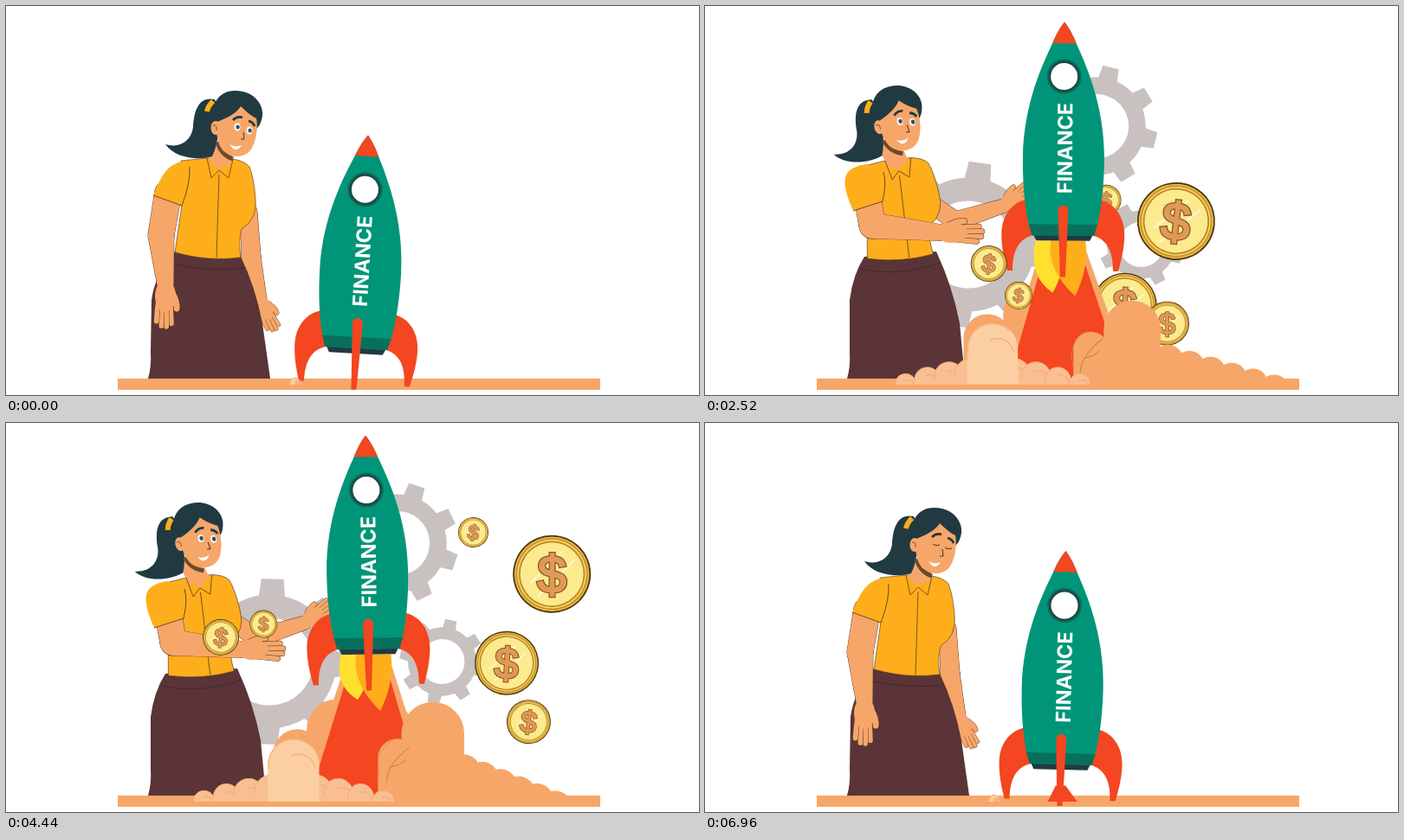
An HTML page with a canvas that plays this animation: 800x450 px, repeating every 7 s.

```html
<!DOCTYPE html>
<html lang="en">
<head>
<meta charset="utf-8">
<title>Finance launch</title>
<style>
html, body { margin: 0; width: 100%; height: 100%; overflow: hidden; background: #fff; }
canvas { display: block; }
</style>
</head>
<body>
<canvas id="stage" width="800" height="450"></canvas>
<script>
const c = document.getElementById('stage').getContext('2d');
const LOOP = 7000, STEP = 40, TAU = Math.PI * 2, RAD = Math.PI / 180;
const SKIN = '#f7a66a', SAND = '#f7a669', RED = '#f44620', GREEN = '#009578';
const DARK = '#213a41', SHIRT = '#ffae1b', SKIRT = '#5a3437', LINE = '#4a3020', GREY = '#c9c1c0';

// Motion
const mix = (a, b, u) => a + (b - a) * u;
const mixPt = (a, b, u) => [mix(a[0], b[0], u), mix(a[1], b[1], u)];
function ease(t, from, to) {
  const s = Math.min(1, Math.max(0, (t - from) / (to - from)));
  return s * s * (3 - 2 * s);
}
const launch = t => 1 / (1 + Math.pow(1016 / Math.max(t, 1), 3.7));
const landing = t => ease(t, 5950, 6980);
const growth = t => launch(t) * (1 - ease(t, 5950, 6920));

// Drawing helpers
function fill(color) { c.fillStyle = color; c.fill(); }
function stroke(color, w) { c.strokeStyle = color; c.lineWidth = w; c.stroke(); }
function poly(pts) {
  c.beginPath();
  pts.forEach(p => c.lineTo(p[0], p[1]));
  c.closePath();
}
function path(d, color) { c.fillStyle = color; c.fill(new Path2D(d)); }
function line(d, color, w) { c.strokeStyle = color; c.lineWidth = w; c.stroke(new Path2D(d)); }
function oval(x, y, rx, ry, color) {
  c.beginPath();
  c.ellipse(x, y, rx, ry, 0, 0, TAU);
  fill(color);
}
function placed(x, y, deg, scale, draw) {
  c.save();
  c.translate(x, y);
  c.rotate(deg * RAD);
  c.scale(scale, scale);
  draw();
  c.restore();
}

// Gears
function gear(x, y, size, deg, scale) {
  if (scale < 0.01) return;
  placed(x, y, deg, scale * size, () => {
    c.beginPath();
    c.arc(0, 0, .81, 0, TAU);
    c.arc(0, 0, .53, 0, TAU, true);
    fill(GREY);
    for (let i = 0; i < 8; i++) {
      c.rotate(TAU / 8);
      poly([[-.16, -.77], [-.135, -1], [.135, -1], [.16, -.77]]);
      fill(GREY);
    }
  });
}
function gears(t) {
  const scale = ease(t, 80, 600) * (1 - ease(t, 6520, 6880));
  const spin = 24 * (1 - Math.exp((880 - t) / 1500));
  gear(452, 139, 70, spin * .85, scale);
  gear(304, 276, 95.5, 24 - spin, scale);
  gear(503.5, 276, 49, 36 - spin * 1.1, scale);
}

// Woman: blends from standing (u = 0) to reaching out (u = 1)
function limb(pts, radii) {
  const part = (grow, color) => pts.forEach((p, i) => {
    oval(p[0], p[1], radii[i] + grow, radii[i] + grow, color);
    if (!i) return;
    const q = pts[i - 1], a = Math.atan2(p[1] - q[1], p[0] - q[0]) + Math.PI / 2;
    const off = (o, r) => [o[0] + Math.cos(a) * r, o[1] + Math.sin(a) * r];
    const r0 = radii[i - 1] + grow, r1 = radii[i] + grow;
    poly([off(q, r0), off(p, r1), off(p, -r1), off(q, -r0)]);
    fill(color);
  });
  part(.4, LINE);
  part(0, SKIN);
}
function hand([x, y], deg, scale) {
  placed(x, y, deg, scale, () => {
    c.lineCap = 'round';
    line('M8-7Q20-14 28-13', LINE, 8);
    line('M8-7Q20-14 28-13', SKIN, 7);
    oval(14, 0, 19, 12, SKIN);
    for (let i = 0; i < 4; i++) {
      const y = i * 5 - 6, tip = 49 - 2.2 * (i - 1.3) ** 2;
      const d = `M20 ${y * .9}Q32 ${y * 1.1} ${tip} ${y * 1.15}`;
      line(d, LINE, 6.6);
      line(d, SKIN, 5.8);
    }
    oval(14, 0, 18, 11, SKIN);
    c.lineCap = 'butt';
  });
}
function head([x, y], tilt, blink) {
  placed(x, y, tilt, 1, () => {
    path('M-26-32C-45-36-50-18-51 0C-53 16-66 25-83 20C-72 36-45 39-29 34C-23 22-20 0-20-15Z', DARK);
    path('M-27 2C-34-24-22-42-3-42C16-43 31-28 29-13C28-6 25 0 22 2L0 10Z', DARK);
    line('M-28-30Q-34-24-35-18', SHIRT, 6);
    line('M-23 17Q-19 32-5 37', '#6b4a2a', 5);
    path('M-23-6C-10-11 0-17 4-24C10-18 16-13 22-10C24 0 22 14 18 22C13 35-3 37-13 30C-21 26-24 12-24 2Z', SKIN);
    oval(-25, 1, 5.5, 8, SKIN);
    line('M-28-2Q-23-3-24 4', LINE, .7);
    for (const [ex, ey] of [[0, 0], [14, 4]]) {
      if (blink) {
        line(`M${ex - 4} ${ey}Q${ex} ${ey + 3} ${ex + 4} ${ey + 1}`, LINE, 1);
      } else {
        oval(ex, ey, 3.4, 4.4, '#fff');
        oval(ex + .6, ey, 2.2, 2.6, '#24566e');
      }
    }
    line('M-5-8Q0-13 6-11', DARK, 2.8);
    line('M13-7Q18-6 20-1', DARK, 2.8);
    line('M7 6L8 14L4 14', LINE, 1);
    path('M-9 20Q-2 24 5 21Q1 28-5 25Z', '#fff');
  });
}
function woman(t) {
  const u = ease(t, 500, 1700) * (1 - ease(t, 5400, 6600));
  const swing = 60 * u * (1 - u);
  const lean = draw => placed(240, 340, -8.5 * u, 1, () => {
    c.translate(-240, -340);
    draw();
  });
  const eye = mixPt([267, 140], [225, 133.5], u);

  const wristR = mixPt([293, 340], [345, 231], u);
  limb([mixPt([280, 238], [266, 232], u), mixPt([283, 290], [289, 249], u), wristR], [10, 11, 8]);
  hand(wristR, mix(62, -38, u), .78);

  const left = 195 - 11 * u, right = 271 - 4 * u, top = 284 + 6 * u;
  path(`M${left} ${top}L${right} ${290 - 6 * u}Q${288 - 2 * u} 325 ${296 - 2 * u} 367L${305 - 5 * u} 431H164
    Q168 418 167 400L${168 - u} 340Q${172 - u} 310 ${left} ${top}Z`, SKIRT);
  line(`M${left - 5} ${top + 14}Q${left + 38} ${top + 24} ${right + 5} ${303 - 6 * u}`, '#3f2326', .7);

  lean(() => {
    const body = 'M232 176L202 179L203 230L195 285Q233 296 271 291Q268 272 272 258Q291 246 288 222Q286 198 281 186Q275 179 262 177Z';
    path(body, SHIRT);
    line(body, LINE, .6);
    line('M246 195L243 291', LINE, .7);
  });
  const base = mixPt([247, 183], [223, 183], u);
  line(`M${eye[0] - 16} ${eye[1] + 20}L${base}`, SKIN, 25);
  lean(() => {
    path('M235 177L246 190L259 177Z', SKIN);
    line('M232 176L237 199L246 190L257 199L262 177', LINE, .7);
  });
  head(eye, -13 * u, t >= 6880);

  const elbow = mixPt([179, 265], [193, 254], u), wristL = mixPt([184, 322], [271, 262], u);
  wristL[1] += swing;
  elbow[1] += swing / 2;
  limb([mixPt([187, 217], [188, 224], u), elbow, wristL], [15.5, 15, 9.5]);
  hand(wristL, 90 * (1 - u), 1);

  const cuff = [170 + u, 219 + 18 * u], pit = [203 + 2 * u, 231 - 5 * u];
  const seam = `L${pit}Q${213 - 3 * u} 205 ${212 - 6 * u} ${186 + 6 * u}`;
  path(`M${208 - 21 * u} ${179 + 4 * u}C${186 - 26 * u} ${182 + 5 * u} ${180 - 26 * u} ${195 + 3 * u} ${cuff}${seam}Z`, SHIRT);
  line(`M${cuff}${seam}`, LINE, .8);
}

// Clouds: puffs as [dx, height, radius]
const BACK = [[-75, 58, 28], [-25, 86, 35], [32, 86, 35], [58, 40, 30]];
const RIGHT = [[3, 80, 36], [-42, 52, 22]];
for (let dx = 42; dx < 170; dx += 23) RIGHT.push([dx, 52 - dx * .36, 19]);
const FRONT = [];
for (let i = 0; i < 9; i++) {
  const bulge = Math.sin(Math.PI * (i + .5) / 9);
  FRONT.push([i * 24 - 98, 15 * bulge - 2, 11 + 9 * bulge]);
}
FRONT.splice(6, 0, [-2, 44, 30]);

function puffs(list, x0, y0, kx, k, color) {
  if (k < .005) return;
  c.save();
  c.beginPath();
  c.rect(0, 0, 800, y0);
  c.clip();
  for (const [dx, h, r] of list) {
    const x = x0 + dx * kx, y = y0 - h * k, q = r * Math.sqrt(k);
    c.beginPath();
    c.arc(x, y, q, Math.PI, 0);
    c.lineTo(x + q, y0);
    c.lineTo(x - q, y0);
    fill(color || (r > 25 ? '#fccfa2' : '#f9bf92'));
    if (color) continue;
    c.beginPath();
    c.arc(x, y, q * .98, Math.PI * .95, Math.PI * 1.75);
    stroke('#f2ab78', 1);
    c.beginPath();
    c.arc(x + q * .2, y + q * .25, q * .65, Math.PI * 1.35, Math.PI * 1.95);
    stroke('#f2ab78', 1.2);
  }
  c.restore();
}
const spread = t => .98 + .14 * Math.cos((t - 3000) / 716);

function backCloud(t) {
  puffs(BACK, 405, 440, spread(t) * growth(t), growth(t), SAND);
}
function rightCloud(t) {
  const g = growth(t), kx = spread(t) * mix(.3, 1, g), k = g * mix(.86, 1.04, ease(t, 3200, 4800));
  puffs(RIGHT, 490, 440, kx, k, SAND);
  if (k < .6) return;
  placed(490 - 42 * kx, 440 - 52 * k, 0, 1, () => {
    line('M-20 22Q-28-8-4-21', '#d98a45', .7);
    line('M-12 28Q-12 8 14-12M-8 10Q2 10 10 2', '#c98a3e', 1.1);
  });
}
function frontCloud(t) {
  const g = growth(t);
  puffs(FRONT, 334, 438, mix(.06, 1.08, g), mix(.04, .98, g));
}

// Rocket
function rocketPose(t) {
  const up = launch(t), down = landing(t);
  const tip = 415 + 3 * (1 - up) + 1.5 * down;
  const x = 415 - 11 * (1 - up) - 4.5 * down + 3.5 * up * (1 - down) * Math.sin((3820 - t) / 132);
  return { x, y: 399 - 135 * up + 134 * down, tilt: Math.atan2(tip - x, 250) / RAD };
}
const HULL = new Path2D('M0 0C4 5 9 13 13.5 24C24 47 47 95 47 158C47 190 44 215 40 233L36 247H-36L-40 233C-44 215-47 190-47 158C-47 95-24 47-13.5 24C-9 13-4 5 0 0Z');
function rocket(p) {
  placed(p.x, p.y, p.tilt, 1, () => {
    c.translate(0, -250);
    for (const side of [-1, 1]) {
      c.save();
      c.scale(side, 1);
      path('M38 205C56 206 71 222 71 246C71 262 67 277 64 288L58 288C58 268 53 249 30 246Z', RED);
      c.restore();
    }
    path('M-35 245H35L31 253H-31Z', DARK);
    c.save();
    c.clip(HULL);
    for (const [y, h, color] of [[0, 250, GREEN], [-2, 26.5, RED], [234, 14, '#08705a']]) {
      c.fillStyle = color;
      c.fillRect(-50, y, 100, h);
    }
    c.restore();
    oval(0, 63, 20, 20, '#0d6b58');
    oval(0, 63, 18, 18, '#1b4a47');
    oval(0, 63, 15.5, 15.5, '#fff');
    placed(1.5, 146, -90, 1, () => {
      c.font = '700 23.5px Inter, Lato, sans-serif';
      c.textAlign = 'center';
      c.fillStyle = '#fff';
      c.fillText('FINANCE', 0, 8.5);
    });
    path('M-6 218A6 6 0 0 1 6 218L3 295H-3Z', RED);
  });
}

// Exhaust
function exhaust(t, p) {
  const f = ease(t, 100, 900) * (1 - .75 * ease(t, 6300, 6960));
  if (f < .01) return;
  const top = mix(437, p.y + 4, Math.sqrt(f)), foot = 414 + 3 * Math.sin(t / 310);
  const plume = (grow, color) => {
    const a = 15 * f + 2 + grow * .6, b = 68 * f + grow;
    poly([[p.x - a, top], [foot - b, 438], [foot + b, 438], [p.x + a, top]]);
    fill(color);
  };
  if (f > .4) plume(10 * f, SAND);
  plume(0, RED);
  const s = (f - .3) / .7;
  if (s <= 0) return;
  const l1 = (58 + 7 * Math.sin(t / 90)) * s, l2 = (62 + 7 * Math.sin(t / 70 + 2)) * s;
  const sway = 4 * Math.sin(t / 130);
  placed(p.x, p.y + 3, 0, 1, () => {
    path(`M-32 0Q-40 ${l1 * .7} ${-14 + sway} ${l1}Q0 ${l1 * .7} 4 0Z`, '#ffe02e');
    path(`M-14 0Q-20 ${l2 * .5} ${12 + sway} ${l2}Q30 ${l2 * .5} 26 0Z`, SHIRT);
  });
}

// Coins fly out of the smoke and slow down; n bends the x and y easing
const COINS = [
  { r: 45, from: [484, 314], to: [642, 169] },
  { r: 37, from: [452, 380], to: [662, 257], n: [.85, 1.65] },
  { r: 25.5, from: [485, 386], to: [613, 344] },
  { r: 17.5, from: [410, 310], to: [550, 119] },
  { r: 21, from: [383, 342], to: [237, 244] },
  { r: 16, from: [384, 375], to: [234, 170], n: [.8, 1.1] }
];
function coin(t, { r, from, to, n = [2.4, 3] }, i) {
  const size = ease(t, 900, 2500) * (1 - ease(t, 6500, 6900));
  if (size < .03) return;
  const s = Math.min(1, Math.max(0, (t - 1800) / 4000)), out = ease(t, 900, 1800);
  const [x, y] = [0, 1].map(k => {
    const far = mix(from[k], to[k], 1 - Math.pow(1 - s, n[k]));
    return mix([425, 400][k], far, out);
  });
  placed(x, y, 5 + 5 * Math.sin(t / 900 + i), size * r / 45, () => {
    const rings = ['#4b3514', '#eab83e', '#c8922c', '#f7d566', '#b98527', '#fbea8e'];
    rings.forEach((color, k) => oval(0, 0, 45 - k * 1.7, 45 - k * 1.7, color));
    line('M-25 11L11-25M-16 26L26-16', '#fff6c4', 2.5);
    c.font = '60px "Liberation Sans", Arial, sans-serif';
    c.textAlign = 'center';
    c.lineWidth = 4.5;
    c.strokeStyle = '#8a5425';
    c.strokeText('$', 0, 21);
    c.lineWidth = 2;
    c.strokeStyle = '#e09a55';
    c.strokeText('$', 0, 21);
    c.fillStyle = '#e09a55';
    c.fillText('$', 0, 21);
  });
}

function draw(t) {
  c.fillStyle = '#fff';
  c.fillRect(0, 0, 800, 450);
  gears(t);
  c.fillStyle = SAND;
  c.fillRect(129, 431, 557, 13);
  woman(t);
  const p = rocketPose(t);
  backCloud(t);
  COINS.slice(0, 4).forEach((k, i) => coin(t, k, i));
  exhaust(t, p);
  rocket(p);
  COINS.slice(4).forEach((k, i) => coin(t, k, i + 4));
  rightCloud(t);
  frontCloud(t);
}

const start = performance.now();
function frame() {
  const t = (performance.now() - start) % LOOP;
  draw(Math.floor(t / STEP) * STEP);
  requestAnimationFrame(frame);
}
frame();
</script>
</body>
</html>
```
